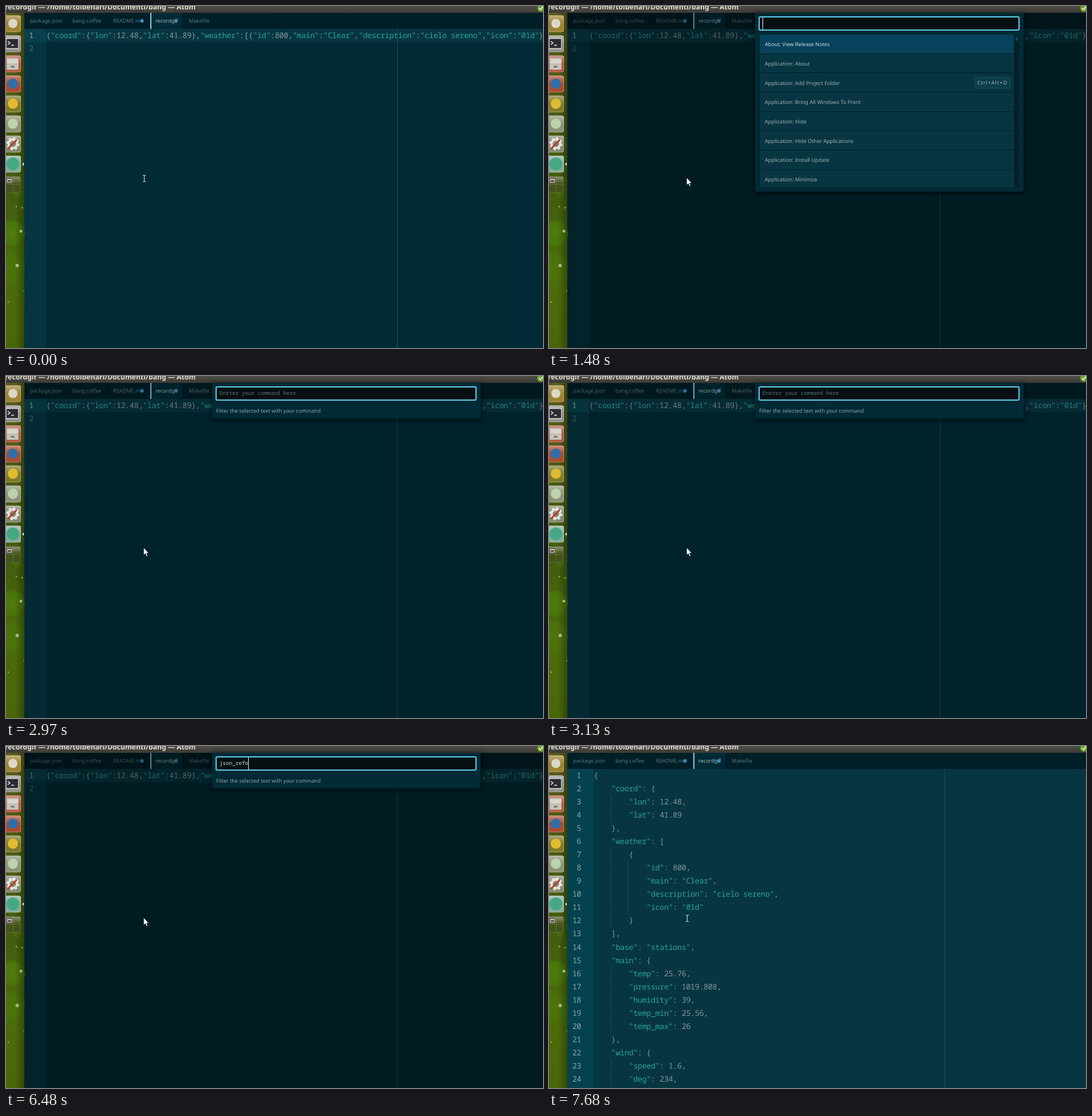
These frames come from a looping animation (938 by 597 pixels, 8 s). An HTML page:

```html
<!DOCTYPE html>
<html lang="en">
<head>
<meta charset="utf-8">
<title>Editor command palette</title>
<style>
  html, body { margin: 0; width: 100%; height: 100%; overflow: hidden; background: #002b36; }
  body { position: relative; font: 9.1px "Noto Sans", sans-serif; text-rendering: geometricPrecision; }
  #stage { position: absolute; left: 0; top: 0; display: block; }
  svg text { white-space: pre; }
  .code { font: 13.5px "Noto Sans Mono", monospace; letter-spacing: -.415px; fill: #839496; }
  .str { fill: #2aa198; }
  .num { text-anchor: end; fill: #8ba6a9; }
  .faint { fill: #4c6d76; }
  .tab { fill: #58757d; }
  .tab.on { fill: #a9bcc0; }
  .title { font: bold 12.15px "Noto Sans", sans-serif; fill: #dfdbd2; }
  .rule { stroke: #1f4e5a; }
  .panel {
    position: absolute; left: 360px; top: 12px; width: 469px; background: #002b36;
    border-radius: 0 0 4px 4px; box-shadow: 0 2px 8px 2px rgba(0, 0, 0, .5);
  }
  .field {
    position: absolute; left: 6px; top: 6px; width: 456px; height: 25px; box-sizing: border-box;
    border: 2px solid #62d2ee; border-radius: 3px; background: #070f13; color: #d3dcdc;
    font: 9.28px/20px "Noto Sans Mono", monospace; white-space: pre; padding-left: 5px;
  }
  .field.hint { color: #59727a; }
  .caret { position: absolute; top: 8px; width: 1px; height: 21px; background: #e8eeee; }
  .list {
    position: absolute; left: 7px; top: 38px; width: 454px; height: 266px;
    overflow: hidden; background: #00212a;
  }
  .row {
    display: flex; align-items: center; box-sizing: border-box; width: 444px; height: 33.66px;
    margin-left: 1px; padding: 1px 6px 0 9px; background: #073642; color: #9db0b2;
    border-bottom: 1px solid #001d25; white-space: pre;
  }
  .row:first-child { background: #08415c; color: #d0dcde; }
  .row b { color: #dbe5e6; }
  .row span { flex: 1; }
  kbd {
    font: 8.9px/18px "Noto Sans", sans-serif; letter-spacing: 1px; padding: 0 4px; margin-left: 3px;
    border: 1px solid #22505c; border-radius: 2px; background: #0c3d4a; color: #a3b5b7;
  }
  .row:first-child kbd { background: #0b5069; border-color: #2a7590; color: #d0dcde; }
  .thumb { position: absolute; left: 448px; top: 3px; width: 4px; border-radius: 2px; background: #0e4656; }
  .note { position: absolute; left: 7px; top: 42px; line-height: 13px; color: #93a5a8; white-space: pre; }
</style>
</head>
<body>
<svg id="stage" width="938" height="597" viewBox="0 0 938 597">
  <defs>
    <linearGradient id="bar" x2="0" y2="1"><stop stop-color="#504e47"/><stop offset="1" stop-color="#3b3a35"/></linearGradient>
    <linearGradient id="wall" x2="0" y2="1">
      <stop stop-color="#5a5a1a"/><stop offset=".3" stop-color="#4c5a12"/>
      <stop offset=".55" stop-color="#425e0e"/><stop offset=".78" stop-color="#4c6c0b"/><stop offset="1" stop-color="#4a660a"/>
    </linearGradient>
    <linearGradient id="shade"><stop offset=".5" stop-opacity="0"/><stop offset="1" stop-opacity=".3"/></linearGradient>
    <radialGradient id="drop"><stop stop-color="#4f7c0b"/><stop offset=".85" stop-color="#48740a"/><stop offset="1" stop-color="#48740a" stop-opacity="0"/></radialGradient>
    <linearGradient id="gloss" x2="0" y2="1"><stop stop-color="#fff" stop-opacity=".35"/><stop offset="1" stop-color="#fff" stop-opacity="0"/></linearGradient>
  </defs>

  <g id="before">
    <rect x="32" y="40" width="906" height="557" fill="#002b36"/>
    <rect x="32" y="40" width="38" height="557" fill="#053540"/>
    <rect x="32" y="40" width="906" height="23" fill="#073642"/>
    <rect x="32" y="40" width="38" height="23" fill="#08414d"/>
    <path class="rule" d="M683.5 40V597"/>
  </g>
  <g id="after">
    <rect x="32" y="40" width="906" height="557" fill="#073642"/>
    <rect x="32" y="40" width="46" height="557" fill="#04424f"/>
    <path class="rule" d="M691.5 40V597"/>
  </g>
  <g id="tabs">
    <rect x="32" y="12" width="906" height="28" fill="#001f27"/>
    <path d="M107.5 12v28M177.5 12v28M308.5 12v28" stroke="#00161c"/>
    <rect x="253" y="12" width="55" height="28" fill="#002b36"/>
    <rect x="252" y="12" width="2" height="28" fill="#7fd3ee"/>
  </g>
  <rect id="dim" x="32" y="12" width="906" height="585"/>

  <g id="dock">
    <rect y="12" width="32" height="585" fill="url(#wall)"/>
    <circle cx="10" cy="397" r="24" fill="url(#drop)"/>
    <circle cx="4" cy="455" r="30" fill="url(#drop)" opacity=".6"/>
    <circle cx="20" cy="328" r="8" fill="url(#drop)" opacity=".5"/>
    <rect y="12" width="32" height="585" fill="url(#shade)"/>
    <g fill="#a9b58a"><circle cx="26" cy="393" r="2.5"/><circle cx="19.5" cy="453" r="3"/></g>
    <g fill="#79b32a"><circle cx="4" cy="517" r="1.5"/><circle cx="31" cy="497" r="1"/><circle cx="18" cy="350" r="1.5"/><circle cx="28" cy="352" r="1.5"/></g>
  </g>
  <path d="M28 276l3-3v6z" fill="#e8e8e0"/>

  <rect width="938" height="12" fill="url(#bar)"/>
  <circle cx="934" cy="4" r="6" fill="#6fae2b"/>
  <path d="M931 4l2.500 2.500L938 1" fill="none" stroke="#fff" stroke-width="1.500"/>

  <path id="beam" d="M239 295.500h2l.5.5.5-.5h2M241.500 296v10M239 306.500h2l.5-.5.5.5h2" fill="none" stroke="#e6ecec"/>
  <path id="arrow" d="M240.300 299.500v13.300l3-2.700 2.300 5 2.200-1-2.300-4.800h4z" fill="#fff" stroke="#0a0f10" stroke-width=".8"/>
</svg>

<div id="palette" class="panel" style="height:312px">
  <div class="field"></div><div class="caret"></div>
  <div class="list"><div id="rows"></div><div class="thumb"></div></div>
</div>
<div id="prompt" class="panel" style="height:62px">
  <div class="field"></div><div class="caret"></div>
  <div class="note">Filter the selected text with your command</div>
</div>

<script>
const $ = q => document.querySelector(q);
const add = (id, svg) => $(id).insertAdjacentHTML('beforeend', svg);
const text = (x, y, body, cls) => `<text x="${x}" y="${y}" class="${cls}">${body}</text>`;
const show = (q, on) => { $(q).style.display = on ? '' : 'none'; };

// Title and tabs
add('#stage', text(-2, 6, 'recordgif — /home/tolbenari/Documenti/bang — Atom', 'title'));
[['package.json', 42], ['bang.coffee', 116], ['README.md', 187], ['recordgif', 261], ['Makefile', 319]]
  .forEach(([name, x], i) => add('#tabs', text(x, 29, name, i === 3 ? 'tab on' : 'tab')));
add('#tabs', '<g fill="#3b8fc4"><circle cx="237.5" cy="26" r="3"/><circle cx="297" cy="26" r="3"/></g>');

// Document, before and after reformatting
const doc = {
  coord: { lon: 12.48, lat: 41.89 },
  weather: [{ id: 800, main: 'Clear', description: 'cielo sereno', icon: '01d' }],
  base: 'stations',
  main: { temp: 25.76, pressure: 1019.808, humidity: 39, temp_min: 25.56, temp_max: 26 },
  wind: { speed: 1.6, deg: 234, gust: 2 }
};
const paint = s => s.replace(/"[^"]*"/g, m => `<tspan class="str">${m}</tspan>`);
const CHAR = 7.685, LINE = 23.04;
add('#before', text(48, 56, 1, 'code num') + text(48, 79, 2, 'code num faint') +
  text(70, 56, paint(JSON.stringify(doc).slice(0, 113)), 'code'));
JSON.stringify(doc, null, 4).split('\n').slice(0, 24).forEach((line, i) => {
  const body = line.trimStart(), indent = line.length - body.length, y = 56 + i * LINE;
  add('#after', text(56, y, i + 1, 'code num') + text(78 + indent * CHAR, y, paint(body), 'code'));
  for (let col = 4; col < indent; col += 4)
    add('#after', `<path class="rule" d="M${Math.round(78 + col * CHAR) - .5} ${y - 16}v${LINE}"/>`);
});

// Launcher
const disc = (c, r = 9) => `<circle cx="12" cy="14" r="${r}" fill="${c}"/>`;
const box = (x, y, w, h, c) => `<rect x="${x}" y="${y}" width="${w}" height="${h}" rx="1" fill="${c}"/>`;
const gear = '<circle cx="12" cy="14" r="7.5" fill="none" stroke="#e4e4de" stroke-width="4"/>' +
  '<circle cx="12" cy="14" r="10" fill="none" stroke="#e4e4de" stroke-width="3" stroke-dasharray="4 3.85"/>' +
  '<path d="M4 22L18 8" stroke="#b8392c" stroke-width="3" stroke-linecap="round"/>';
[
  ['#9c8431', disc('#dcd8c8', 8)],
  ['#8d9188', box(0, 4, 22, 20, '#d0d0cb') + box(1, 6, 20, 16, '#2c2b31') +
    '<path d="M3 10l4 3-4 3M9 17h5" fill="none" stroke="#eee" stroke-width="1.5"/>'],
  ['#b5563c', box(1, 4, 21, 21, '#b9b7ae') + box(2, 6, 19, 8, '#d9d6cd') + box(2, 16, 19, 8, '#c9c6bd') + box(8, 18, 7, 3, '#77756e')],
  ['#ad4c31', disc('#2f6fa9')],
  ['#7e7c2b', disc('#e0bb32')],
  ['#8d9476', disc('#bcd3ad')],
  ['#84896f', gear],
  ['#83ae98', disc('#45a884', 11)]
].forEach(([tile, art], i) => add('#dock', `<g transform="translate(0 ${16.5 + i * 35})">
  <rect x="-6" width="32" height="29" rx="3" fill="${tile}"/>
  <rect x="-6" width="32" height="14" rx="3" fill="url(#gloss)"/>
  <rect x="-5.5" y=".5" width="31" height="28" rx="3" fill="none" stroke="#fff" stroke-opacity=".3"/>${art}</g>`));
add('#dock', `<g stroke="#5f6c38"><rect x="-6" y="297.5" width="31" height="28" rx="3" fill="#43541a"/>
  <path d="M12.5 298v27M0 311.5h25"/></g><rect y="298" width="25" height="13" fill="url(#gloss)"/>` +
  box(0, 300, 11, 10, '#6f6a58') + box(2, 302, 8, 6, '#c9c4b8') + box(3, 304, 6, 3, '#584a44'));

// Command lists: *marks* are matched letters, keys follow the bars
const lists = [[
  'About: View Release Notes', 'Application: About', 'Application: Add Project Folder|Ctrl+Alt+O',
  'Application: Bring All Windows To Front', 'Application: Hide', 'Application: Hide Other Applications',
  'Application: Install Update', 'Application: Minimize'
], [
  '*Ba*ng: Edit Text|Ctrl+Alt+E', 'Core: *Ba*ckspace|Shift+Backspace|Backspace', 'Status *Ba*r: Toggle',
  '*B*ang: Run *A* Command|Ctrl+Alt+C', '*B*ookmarks: View *A*ll|Ctrl+F2', 'Window: Toggle Menu *Ba*r',
  'Application: *B*ring *A*ll Windows To Front', '*B*r*a*cket Matcher: Close Tag|Ctrl+Alt+.'
]].map(list => list.map(item => {
  const [name, ...keys] = item.split('|');
  return `<div class="row"><span>${name.replace(/\*(\w+)\*/g, '<b>$1</b>')}</span>${keys.map(k => `<kbd>${k}</kbd>`).join('')}</div>`;
}).join(''));

// Timeline: [start, value] steps
const LOOP = 8000, OPEN = 500, SWAP = 2970, CLOSE = 7680;
const dimming = [[0, 0], [500, .08], [550, .17], [600, .26], [650, .36], [SWAP, .2], [3180, .36], [CLOSE, 0]];
const blink = [[0, 0], [500, 1], [990, 0], [1390, 1], [2180, 0], [2570, 1], [SWAP, 0], [3450, 1], [3840, 0], [4140, 1], [5340, 0], [5620, 1]];
const query = [1550, 1780];
const command = [4140, 4410, 4610, 4850, 5620, 5960, 6080, 6290, 6480, 6610, 6750, 6960, 7250];
const at = (steps, t) => steps.reduce((v, [start, value]) => t >= start ? value : v, 0);
const typed = (word, times, t) => word.slice(0, times.filter(k => t >= k).length);

function fill(id, value, hint, caretOn) {
  const field = $(id + ' .field'), caret = $(id + ' .caret');
  field.textContent = value || hint;
  field.classList.toggle('hint', !value);
  caret.style.left = Math.floor(13 + value.length * 5.57) + 'px';
  caret.style.opacity = caretOn;
}

let shown = -1;
function draw(t) {
  const palette = t >= OPEN && t < SWAP, prompt = t >= SWAP && t < CLOSE;
  const pointer = t >= OPEN && t < 7640, list = t >= 1700 ? 1 : 0, caret = at(blink, t);
  show('#before', t < CLOSE);
  show('#after', t >= CLOSE);
  show('#palette', palette);
  show('#prompt', prompt);
  show('#arrow', pointer);
  show('#beam', !pointer);
  $('#dim').setAttribute('opacity', at(dimming, t));
  if (palette) fill('#palette', typed('ba', query, t), '', caret);
  if (prompt) fill('#prompt', typed('json_reformat', command, t), 'Eneter your command here', caret);
  if (list !== shown) {
    $('#rows').innerHTML = lists[shown = list];
    $('.thumb').style.height = (list ? 40 : 8) + 'px';
  }
}

const begin = performance.now();
function tick() {
  draw((performance.now() - begin) % LOOP);
  requestAnimationFrame(tick);
}
tick();
</script>
</body>
</html>
```
